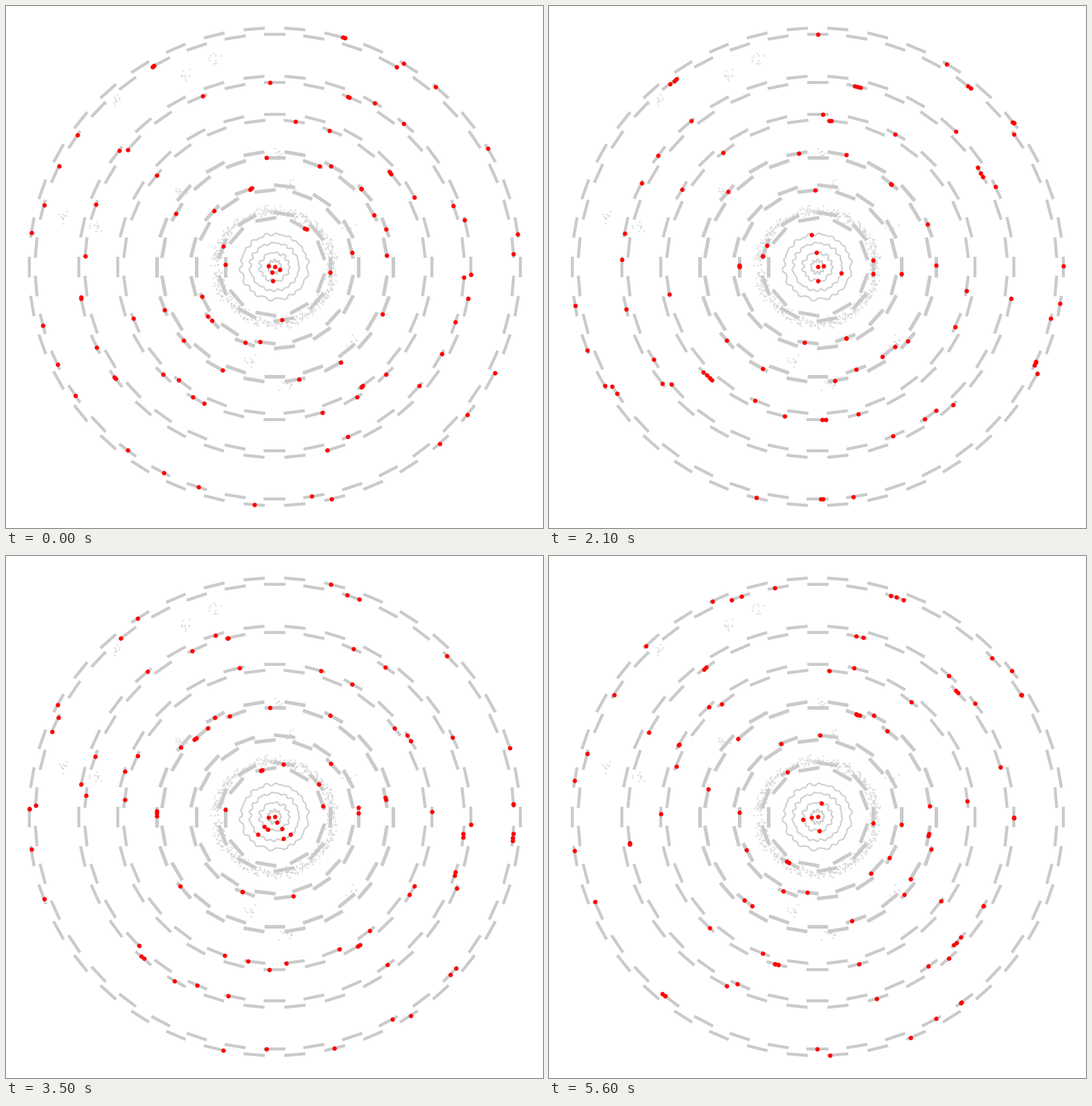
These frames come from a looping animation (759x737 px, 6.3 s). A matplotlib script:

```python
import numpy as np
import matplotlib.pyplot as plt
from matplotlib.animation import FuncAnimation
from matplotlib.collections import LineCollection

W, H, DPI = 759, 737, 100
PX = 72 / DPI                    # one pixel in points
CX, CY, ASPECT = 379.5, 368.2, 0.971
HALF = 15                        # half length of a module
EVENTS, TRACK_EVENT = 9, 6
RED, BLUE = "#ff0000", "#0000ff"

# modules in the ring, outer radius, inner radius
RINGS = [(18, 78, 70), (26, 118, 111), (36, 167, 159),
         (48, 222, 213), (60, 277, 268), (76, 347, 338)]
WAVES = [9, 20.5, 34.5, 47.5]    # radii of the wavy core layers
SMUDGES = [(294, 76), (253, 97), (152, 133), (80, 296), (126, 312), (248, 264),
           (385, 207), (400, 252), (345, 500), (396, 537), (490, 475), (485, 312)]


def polar(r, a):
    return CX + r * np.cos(a), CY - ASPECT * r * np.sin(a)


def on_module(ring, i, s):
    """Point at offset s along module i; even modules sit further out."""
    n, outer, inner = ring
    r = inner if i % 2 else outer
    return polar(np.hypot(r, s), 2 * np.pi * i / n + np.arctan2(s, r))


def draw_modules(ax):
    for ring in RINGS:
        width = 5 if ring[1] < 200 else 4.2
        lines = [[on_module(ring, i, -HALF), on_module(ring, i, HALF)]
                 for i in range(ring[0])]
        ax.add_collection(LineCollection(lines, colors="#cacaca", linewidths=width * PX,
                                         capstyle="butt"))


def draw_waves(ax, rng):
    a = np.linspace(0, 2 * np.pi, 400)
    for r in WAVES:
        bumps = 5 + int(r / 2.5)
        wobble = sum(rng.normal(0, 0.55) * np.sin(k * a + rng.uniform(0, 6))
                     for k in range(bumps // 2, bumps + 4))
        ax.plot(*polar(r + np.clip(wobble, -2, 2), a), color="#cecece", lw=2 * PX)


def draw_specks(ax, rng):
    halo = polar(rng.triangular(73, 83, 91, 650), rng.uniform(0, 2 * np.pi, 650))
    specks = [np.transpose(halo)]
    specks += [rng.normal(p, 4.5, (10, 2)) for p in SMUDGES]
    x, y = np.round(np.vstack(specks)).T
    ax.plot(x, y, "s", color="#d4d4d4", ms=1.9 * PX, mew=0)


def track_points():
    """One curved particle path, read out where it crosses each layer."""
    def angle(r):
        return np.pi + np.radians(17.8 - 0.03 * r)

    pts = [polar(r, angle(r)) for r in WAVES]
    for ring in RINGS:
        n, outer, inner = ring
        a = angle(outer)
        i = round(a * n / (2 * np.pi))
        r = inner if i % 2 else outer
        pts.append(on_module(ring, i, r * np.tan(a - 2 * np.pi * i / n)))
    return pts


def event_hits(k):
    rng = np.random.default_rng(40 + k)
    pts = [(CX, CY)]
    for r in WAVES:
        pts += [polar(r, a) for a in rng.uniform(0, 2 * np.pi, rng.poisson(1.2))]
    for ring in RINGS:
        i, s = 0, 0
        for j in range(max(3, round(ring[1] / 12.7 + rng.normal(0, 2)))):
            if j and rng.random() < 0.12:      # close neighbour of the last hit
                s = np.clip(s + rng.uniform(-6, 6), -HALF, HALF)
            else:
                i, s = rng.integers(ring[0]), rng.uniform(-HALF, HALF) * 0.9
            pts.append(on_module(ring, i, s))
    return pts


fig = plt.figure(figsize=(W / DPI, H / DPI), dpi=DPI, facecolor="white")
ax = fig.add_axes([0, 0, 1, 1])
ax.set(xlim=(0, W), ylim=(H, 0))
ax.axis("off")

rng = np.random.default_rng(5)
draw_specks(ax, rng)
draw_waves(ax, rng)
draw_modules(ax)

track, = ax.plot(*zip(*track_points()), "o", color=BLUE, ms=6.4 * PX, mew=0, zorder=5)
hits, = ax.plot([], [], "o", color=RED, ms=6.2 * PX, mew=0, zorder=6)


def update(k):
    hits.set_data(*zip(*event_hits(k)))
    track.set_visible(k == TRACK_EVENT)
    return track, hits


anim = FuncAnimation(fig, update, frames=EVENTS, interval=700, repeat=True)
plt.show()
```
